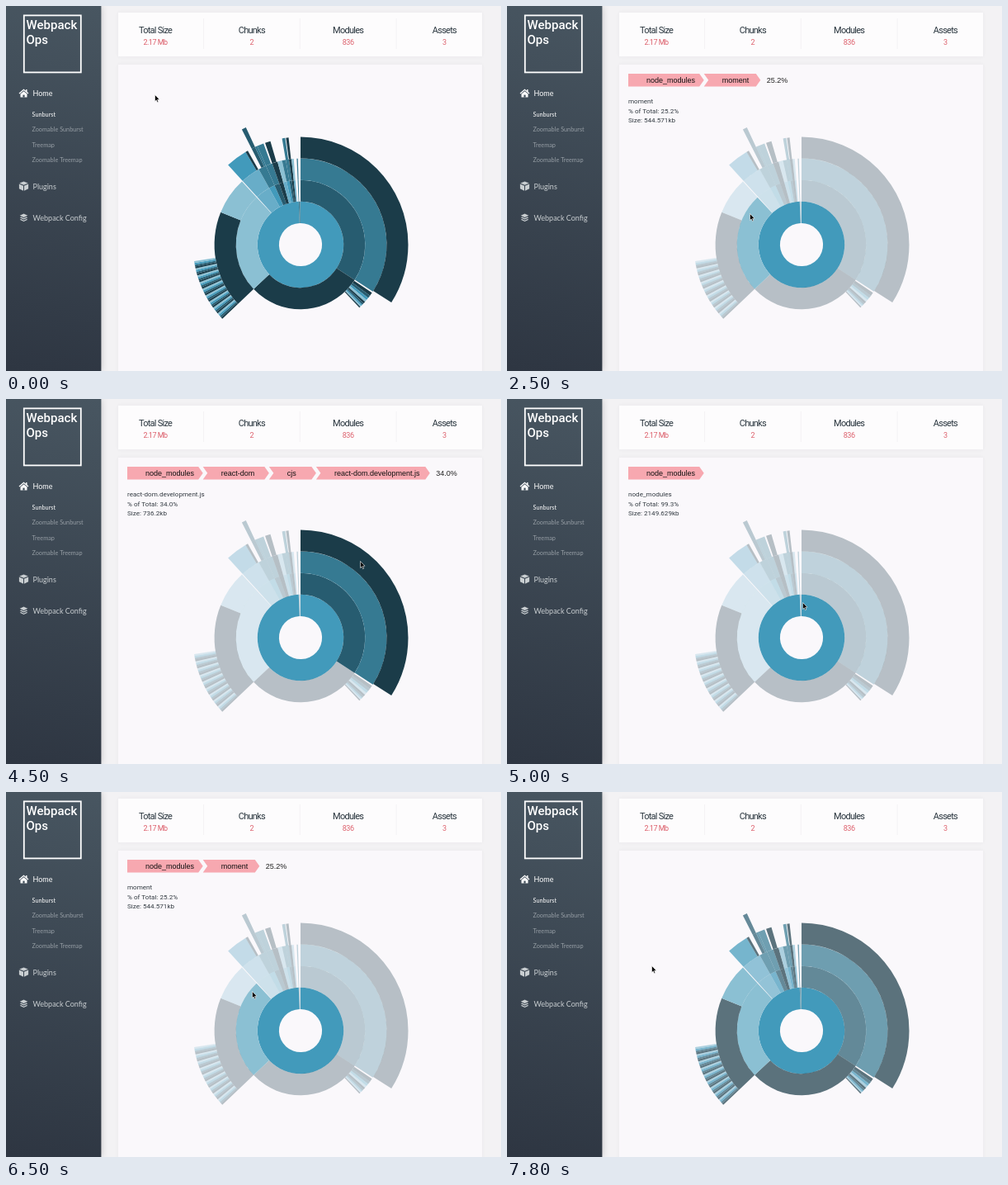
These frames come from a looping animation (600x442 px, 8000 ms). An HTML page with a canvas:

```html
<!DOCTYPE html>
<html lang="en">
<head>
<meta charset="utf-8">
<title>Bundle sunburst</title>
<style>
  html, body { margin: 0; width: 100%; height: 100%; overflow: hidden; }
  canvas { display: block; width: 600px; height: 442px; }
</style>
</head>
<body>
<canvas id="stage"></canvas>
<script>
const canvas = document.getElementById('stage');
const ctx = canvas.getContext('2d');
const ratio = window.devicePixelRatio || 1;
canvas.width = 600 * ratio;
canvas.height = 442 * ratio;

const LOOP = 8000, LEAVE = 7270, FADE = 1000;
const CX = 357, CY = 289, RING = 26.1;
const TOTAL_KB = 2164.8, TURN = 2 * Math.PI;
const DARK = '#1b3c49', DEEP = '#275c70', TEAL = '#367a92',
      BLUE = '#429abb', MID = '#68adc8', LIGHT = '#8bc0d3';

const node = (name, size, color, ...children) => ({ name, size, color, children });
const gap = size => node('', size, null);

// Siblings whose sizes shrink by a constant factor and add up to total.
function series(count, total, factor, make) {
  const weights = Array.from({ length: count }, (_, i) => factor ** i);
  const sum = weights.reduce((a, b) => a + b);
  return weights.map((w, i) => make(total * w / sum, i));
}

function smallPackage(size, i) {
  const color = [TEAL, DARK, LIGHT, TEAL][i % 4];
  const inner = [DEEP, DARK, MID, BLUE][i % 4];
  const leaf = i % 4 < 2 ? [node('index.js', size * 0.8, color)] : [];
  return node('util', size, inner, node('lib', size, color, ...leaf));
}

const fileColors = [DARK, DEEP, BLUE, LIGHT];
const file = (size, i) => node('file.js', size, fileColors[i % 4]);

const tree = node('', TOTAL_KB, null,
  node('node_modules', 2149.629, BLUE,
    node('react-dom', 740.318, DEEP,
      node('cjs', 738.956, TEAL, node('react-dom.development.js', 736.2, DARK))),
    node('lodash', 622, DARK, gap(5), ...series(9, 78, 0.88, file)),
    node('moment', 544.571, LIGHT,
      node('locale', 394, DARK, ...series(36, 208, 1, file)),
      node('moment.js', 150.571, LIGHT)),
    gap(3.5),
    node('react', 80, MID,
      node('cjs', 80, MID, node('react.development.js', 70, BLUE), node('min.js', 8, DARK))),
    node('events', 32, BLUE,
      node('lib', 32, TEAL, gap(12), node('src', 12, DEEP, node('index.js', 12, DEEP)), node('api', 8, TEAL))),
    ...series(7, 115, 0.83, smallPackage)),
  node('src', 13, TEAL, node('app', 4.5, TEAL, node('index.js', 4.5, TEAL))));

const slices = [];
function layOut(item, start, depth, parent) {
  Object.assign(item, { start, end: start + item.size / TOTAL_KB * TURN, depth, parent });
  if (item.color) slices.push(item);
  let at = start;
  for (const child of item.children) {
    layOut(child, at, depth + 1, item);
    at = child.end;
  }
}
layOut(tree, 0, 0, null);

// time, x, y of the pointer's resting points
const stops = [
  [0, 181, 108], [1250, 181, 108], [1800, 235, 234], [2000, 255, 241],
  [2500, 295, 252], [2800, 347, 249], [3800, 410, 211], [4500, 430, 197],
  [5000, 359, 247], [5300, 347, 243], [6000, 291, 203], [6500, 299, 242],
  [7000, 272, 232], [7800, 176, 211], [LOOP, 176, 211]
];

function pointerAt(time) {
  const next = stops.findIndex(stop => stop[0] > time);
  const [t0, x0, y0] = stops[next - 1], [t1, x1, y1] = stops[next];
  const eased = 1 - (1 - (time - t0) / (t1 - t0)) ** 2;
  return [x0 + (x1 - x0) * eased, y0 + (y1 - y0) * eased];
}

function sliceAt([x, y]) {
  const depth = Math.floor(Math.hypot(x - CX, y - CY) / RING);
  const bearing = (Math.atan2(x - CX, CY - y) + TURN) % TURN;
  return slices.find(s => s.depth === depth && s.start <= bearing && bearing < s.end);
}

function trail(slice) {
  const path = [];
  for (let s = slice; s && s.depth; s = s.parent) path.unshift(s);
  return path;
}

function text(str, x, y, font, color, align = 'left', spacing = 0) {
  ctx.font = font;
  ctx.fillStyle = color;
  ctx.textAlign = align;
  ctx.letterSpacing = spacing + 'px';
  ctx.fillText(str, x, y);
}

function poly(points, color) {
  ctx.beginPath();
  points.forEach(([x, y]) => ctx.lineTo(x, y));
  ctx.closePath();
  ctx.fillStyle = color;
  ctx.fill();
}

function rect(x, y, w, h, color) {
  ctx.fillStyle = color;
  ctx.fillRect(x, y, w, h);
}

function shadowRect(x, y, w, h, color, shadow, blur) {
  ctx.save();
  ctx.shadowColor = shadow;
  ctx.shadowBlur = blur * ratio;
  rect(x, y, w, h, color);
  ctx.restore();
}

function drawHome(x, y) {
  ctx.strokeStyle = '#fff';
  ctx.lineWidth = 1.3;
  ctx.beginPath();
  ctx.moveTo(x - 5.5, y);
  ctx.lineTo(x, y - 4.7);
  ctx.lineTo(x + 5.5, y);
  ctx.stroke();
  poly([[x - 4, y + 0.6], [x, y - 2.8], [x + 4, y + 0.6], [x + 4, y + 4.6], [x - 4, y + 4.6]], '#fff');
  rect(x - 1.1, y + 1.6, 2.2, 3, '#45525d');
  rect(x + 2.6, y - 5, 1.4, 3, '#fff');
}

function drawCube(x, y, color) {
  const diamond = [[x, y - 5.6], [x + 5.2, y - 3.4], [x, y - 1.2], [x - 5.2, y - 3.4]];
  poly(diamond, color);
  for (const side of [-1, 1]) {
    poly([[x + side * 5.6, y - 2.5], [x + side * 0.5, y - 0.3], [x + side * 0.5, y + 5.8], [x + side * 5.6, y + 3.3]], color);
  }
}

function drawLayers(x, y, color) {
  poly([[x, y - 4.8], [x + 4.8, y - 2.5], [x, y - 0.2], [x - 4.8, y - 2.5]], color);
  for (const dy of [0, 2.6]) {
    poly([[x - 4.8, y + dy], [x - 3.3, y + dy - 0.7], [x, y + dy + 0.9], [x + 3.3, y + dy - 0.7], [x + 4.8, y + dy], [x, y + dy + 2.3]], color);
  }
}

function drawSidebar() {
  const shade = ctx.createLinearGradient(115, 0, 20, 442);
  shade.addColorStop(0, '#485661');
  shade.addColorStop(1, '#2e3642');
  shadowRect(0, 0, 115.4, 442, shade, 'rgba(0,0,0,.25)', 9);

  ctx.strokeStyle = '#fff';
  ctx.lineWidth = 1.8;
  ctx.strokeRect(21.8, 11.4, 69, 69);
  const brand = '500 15px Roboto, sans-serif';
  text('Webpack', 24.5, 28, brand, '#fff');
  text('Ops', 24.5, 46, brand, '#fff');

  const main = '9px Lato, sans-serif', sub = '7.3px Lato, sans-serif', soft = '#c9ced1';
  text('Home', 32.5, 109, main, '#fff');
  text('Plugins', 32.5, 221.5, main, soft);
  text('Webpack Config', 32.5, 259.5, main, soft);
  ['Sunburst', 'Zoomable Sunburst', 'Treemap', 'Zoomable Treemap'].forEach((name, i) =>
    text(name, 31.5, 133.8 + i * 18.4, sub, i ? '#959da4' : '#fff'));
  drawHome(21.5, 106);
  drawCube(21.5, 218, soft);
  drawLayers(21.5, 256.2, soft);
}

function drawPanels() {
  const shadow = 'rgba(60,50,70,.05)';
  rect(0, 0, 600, 442, '#f3f2f4');
  shadowRect(136, 8, 441, 53, '#fdfcfd', shadow, 5);
  shadowRect(136, 71, 441, 380, '#faf8fb', shadow, 5);
  const summary = [['Total Size', '2.17 Mb'], ['Chunks', '2'], ['Modules', '836'], ['Assets', '3']];
  summary.forEach(([label, value], i) => {
    const x = 181 + i * 116.8;
    text(label, x, 32.6, '11px Roboto, sans-serif', '#28343d', 'center', -0.75);
    text(value, x, 46.6, '9px Roboto, sans-serif', '#dc5f6b', 'center', -0.5);
    if (i) rect(x - 58.8, 15, 1, 37, '#f4f2f5');
  });
}

function drawSlice({ depth, start, end, color }) {
  const a = start - TURN / 4, b = end - TURN / 4;
  ctx.beginPath();
  ctx.arc(CX, CY, (depth + 1) * RING, a, b);
  ctx.arc(CX, CY, depth * RING, b, a, true);
  ctx.fillStyle = color;
  ctx.fill();
}

function drawSunburst(lit, dim) {
  for (const slice of slices) {
    ctx.globalAlpha = lit.includes(slice) ? 1 : dim;
    drawSlice(slice);
  }
  ctx.globalAlpha = 1;
}

function drawDetails(path) {
  const { name, size } = path[path.length - 1];
  const percent = (size / TOTAL_KB * 100).toFixed(1) + '%';
  const font = '9px "Liberation Sans", Arial, sans-serif';
  let x = 147;
  path.forEach((part, i) => {
    const end = x + 45.5 + part.name.length * 3.85;
    const outline = [[x, 82], [end - 5.5, 82], [end, 89.7], [end - 5.5, 97.4], [x, 97.4]];
    if (i) outline.push([x + 5.5, 89.7]);
    poly(outline, '#f7a8b0');
    text(part.name, x + 22, 92.8, font, '#111');
    x = end;
  });
  if (path.length > 1) text(percent, x + 7.5, 92.8, font, '#222');

  [name, '% of Total: ' + percent, `Size: ${size}kb`].forEach((line, i) =>
    text(line, 147, 118 + i * 11.5, '8.1px Roboto, sans-serif', '#333b42'));
}

function drawPointer([x, y]) {
  const shape = [[0, 0], [0, 8], [1.8, 6.4], [3, 9.2], [4.3, 8.6], [3.1, 5.9], [5.5, 5.7]]
    .map(([dx, dy]) => [x - 0.5 + dx, y - 0.5 + dy]);
  poly(shape, '#000');
  ctx.strokeStyle = '#fff';
  ctx.lineWidth = 0.6;
  ctx.stroke();
}

const easeCubic = p => p < 0.5 ? 4 * p ** 3 : 1 - 4 * (1 - p) ** 3;

// The screen refreshes twice per half second: at 0 and 300 ms.
function refreshTime(time) {
  const phase = time % 500;
  return time - phase + (phase >= 300 ? 300 : 0);
}

function render(time) {
  const now = refreshTime(time);
  const pointer = pointerAt(now);
  const leaving = now >= LEAVE;
  const lit = trail(sliceAt(leaving ? pointerAt(7000) : pointer));
  const dim = leaving ? 0.3 + 0.7 * easeCubic((now - LEAVE) / FADE) : lit.length ? 0.3 : 1;

  ctx.setTransform(ratio, 0, 0, ratio, 0, 0);
  drawPanels();
  drawSidebar();
  drawSunburst(lit, dim);
  if (lit.length && !leaving) drawDetails(lit);
  drawPointer(pointer);
}

const origin = performance.now();
function tick() {
  render((performance.now() - origin) % LOOP);
  requestAnimationFrame(tick);
}
tick();
</script>
</body>
</html>
```
